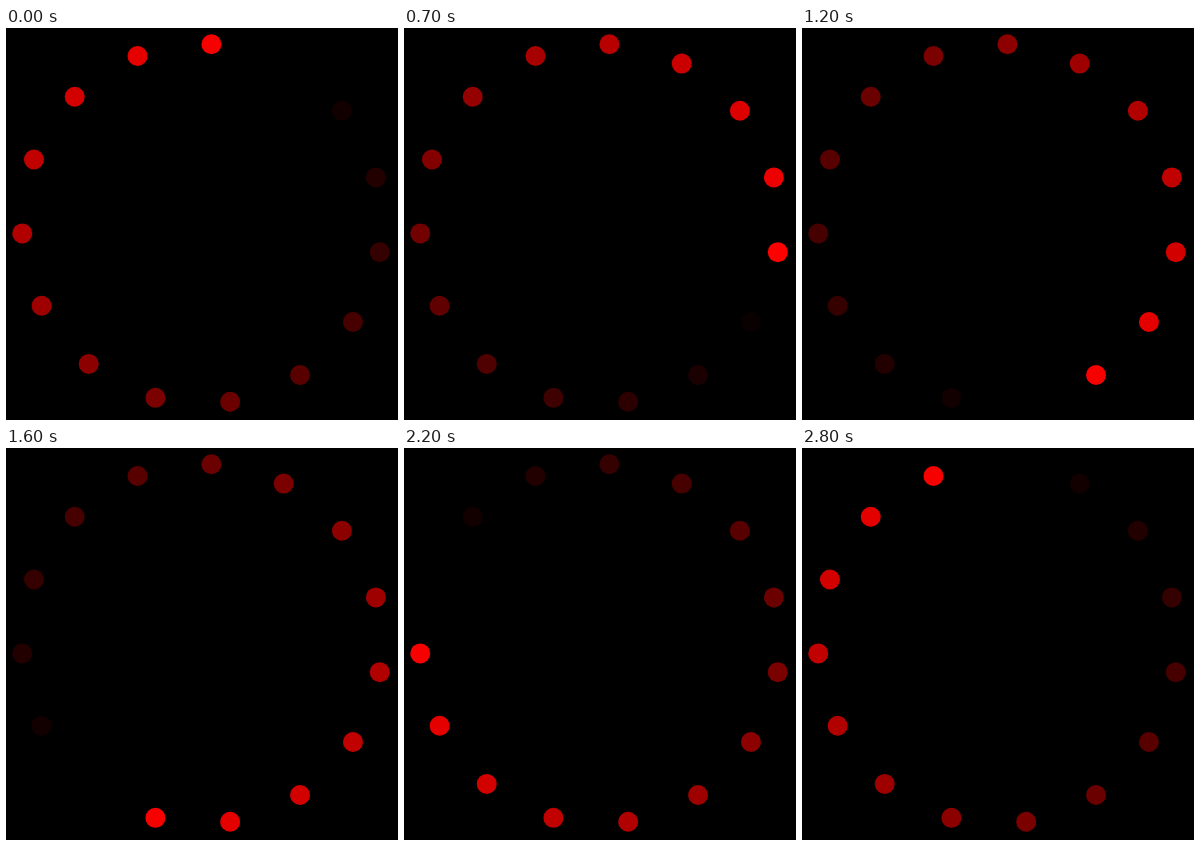
These frames come from a looping animation (392x392 px, 2900 ms). An HTML page with a canvas:

```html
<!DOCTYPE html>
<html>
<head>
<meta charset="utf-8">
<style>
html, body { margin: 0; height: 100%; overflow: hidden; background: #000; }
canvas { display: block; }
</style>
</head>
<body>
<canvas id="stage" width="392" height="392"></canvas>
<script>
const ctx = document.getElementById('stage').getContext('2d');
const LOOP = 2900, STEP = 100, FADE = 2900;
const DOTS = 15, SPACING = 200, TURN = DOTS * SPACING;
const CENTER = 196, RING = 180, RADIUS = 10;

function draw(time) {
  ctx.fillStyle = '#000';
  ctx.fillRect(0, 0, 392, 392);
  for (let i = 0; i < DOTS; i++) {
    // Each dot lights up in turn, then fades linearly to black.
    const age = (time - i * SPACING + STEP + TURN) % TURN;
    const level = Math.max(0, 1 - age / FADE);
    const angle = (3 + i * 360 / DOTS) * Math.PI / 180;
    ctx.fillStyle = `rgb(${Math.round(255 * level)}, 0, 0)`;
    ctx.beginPath();
    ctx.arc(CENTER + RING * Math.sin(angle), CENTER - RING * Math.cos(angle), RADIUS, 0, 2 * Math.PI);
    ctx.fill();
  }
}

const start = performance.now();
function tick() {
  const elapsed = (performance.now() - start) % LOOP;
  draw(Math.floor(elapsed / STEP) * STEP);
  requestAnimationFrame(tick);
}
tick();
</script>
</body>
</html>
```
